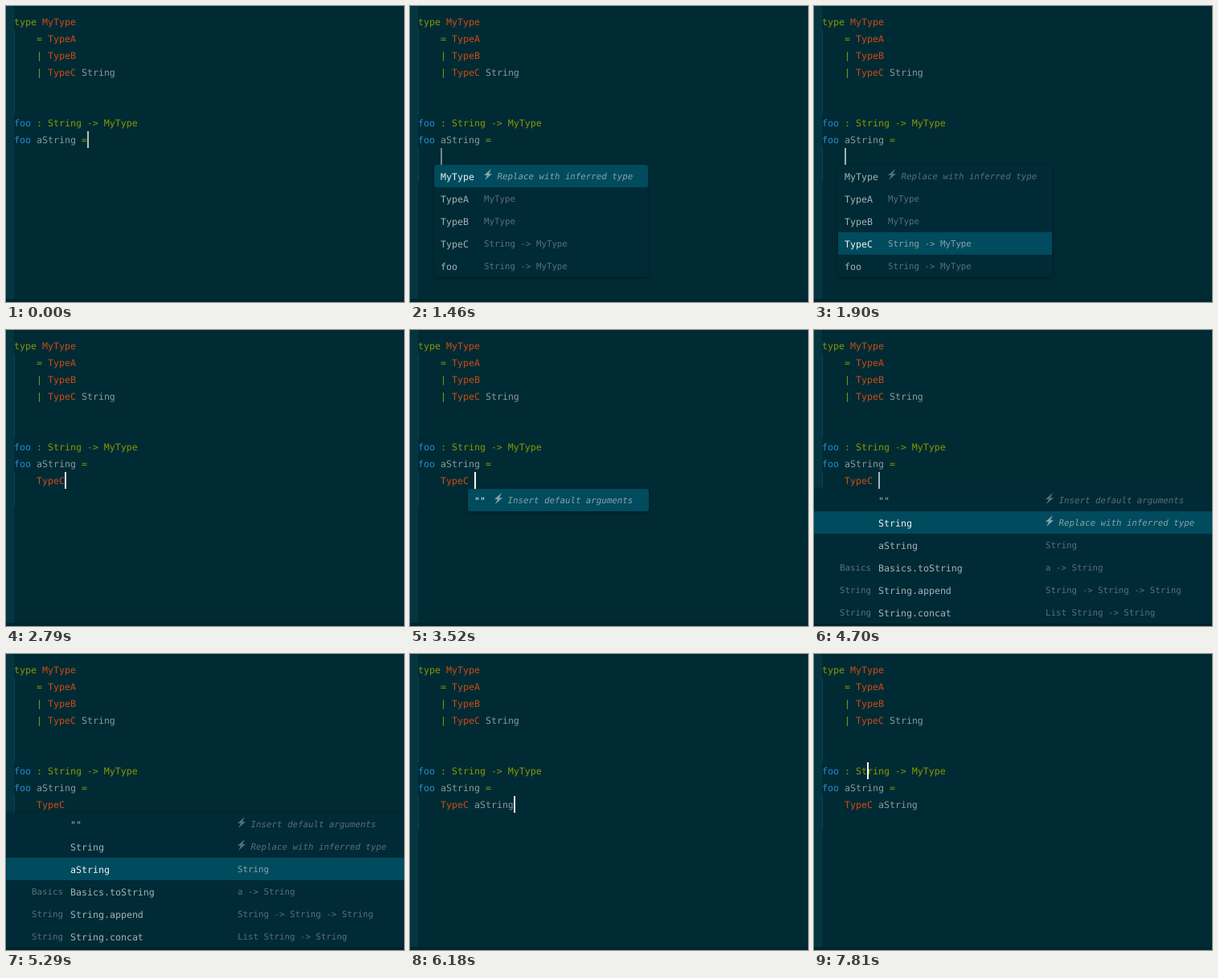
Write an HTML page that moves like this. It is 495 px wide and 369 px high and loops after 8000 ms.

```html
<!DOCTYPE html>
<html lang="en">
<head>
<meta charset="utf-8">
<title>Type-aware completion</title>
<style>
  html, body { margin: 0; width: 100%; height: 100%; overflow: hidden; background: #002b34; }
  svg { display: block; width: 495px; height: 369px; }
  text {
    font: 11.627px "DejaVu Sans Mono", monospace;
    font-variant-ligatures: none;
    text-rendering: geometricPrecision;
    white-space: pre;
  }
  .key { fill: #859900; }
  .type { fill: #cb4b16; }
  .fn { fill: #268bd2; }
  .var { fill: #8a9a9b; }
  .guide { fill: #0b4452; }
  .box { fill: #002a36; filter: drop-shadow(0 1px 2px #001a22); }
  .bar { fill: #004b5d; }
  .word { fill: #a3b3b5; }
  .note { fill: #587077; font-size: 10.797px; }
  .hint { font-style: italic; }
  .bolt { fill: #587077; }
  .on .word { fill: #eef3f3; }
  .on .note, .on .bolt { fill: #86a4ab; }
</style>
</head>
<body>
<svg id="stage" viewBox="0 0 495 369"></svg>
<script>
const LOOP = 8000, LEFT = 10, TOP = 9, CELL = 7, LINE = 21, ROW = 28, MENU_TOP = 198;
const stage = document.getElementById('stage');

function add(parent, tag, attrs, text) {
  const el = document.createElementNS('http://www.w3.org/2000/svg', tag);
  for (const name in attrs) el.setAttribute(name, attrs[name]);
  if (text) el.textContent = text;
  parent.appendChild(el);
  return el;
}

const rect = (parent, x, y, width, height, more) =>
  add(parent, 'rect', { x, y, width, height, ...more });

const show = (el, on) => el.setAttribute('visibility', on ? 'inherit' : 'hidden');

// One code line; parts are [class, text] pairs
function code(row, col, ...parts) {
  const line = add(stage, 'text', { x: LEFT + col * CELL, y: TOP + 15 + row * LINE });
  return parts.map(([cls, text]) => add(line, 'tspan', { class: cls }, text));
}

rect(stage, 0, 0, 495, 369, { fill: '#002b34' });
rect(stage, 0, 0, 10, 369, { fill: '#053541' });
rect(stage, 0, 365, 495, 4, { fill: '#00262f' });
rect(stage, 10, 30, 1, 105, { class: 'guide' });
const bodyGuide = rect(stage, 10, 177, 1, 42, { class: 'guide' });

code(0, 0, ['key', 'type '], ['type', 'MyType']);
code(1, 4, ['key', '= '], ['type', 'TypeA']);
code(2, 4, ['key', '| '], ['type', 'TypeB']);
code(3, 4, ['key', '| '], ['type', 'TypeC '], ['var', 'String']);
code(6, 0, ['fn', 'foo '], ['key', ': String -> MyType']);
code(7, 0, ['fn', 'foo '], ['var', 'aString '], ['key', '=']);
const [ctor, arg] = code(8, 4, ['type', 'TypeC '], ['var', 'aString']);

// Items are [word, note, module]; a note starting with "!" is an italic hint
function menu(x, width, radius, wordX, noteX, items) {
  const group = add(stage, 'g', {});
  const height = items.length * ROW;
  rect(group, x, MENU_TOP, width, height, { class: 'box', rx: radius });
  const bar = rect(group, x, MENU_TOP, width, ROW, { class: 'bar' });
  const rows = items.map(([word, note, module], i) => {
    const y = MENU_TOP + i * ROW, row = add(group, 'g', {});
    add(row, 'text', { class: 'word', x: wordX, y: y + 18.5 }, word);
    if (module) add(row, 'text', { class: 'note', x: wordX - 9, y: y + 18, 'text-anchor': 'end' }, module);
    if (note[0] === '!') {
      add(row, 'path', { class: 'bolt', d: 'M10 7H6l3-7-9 9h4l-3 7z', transform: `translate(${noteX} ${y + 5}) scale(1 .88)` });
      add(row, 'text', { class: 'note hint', x: noteX + 16.5, y: y + 18 }, note.slice(1));
    } else {
      add(row, 'text', { class: 'note', x: noteX, y: y + 18 }, note);
    }
    return row;
  });
  return pick => {
    show(group, pick >= 0);
    if (pick < 0) return;
    bar.setAttribute('y', MENU_TOP + pick * ROW);
    bar.setAttribute('rx', pick ? 0 : radius);
    rows.forEach((row, i) => row.setAttribute('class', i === pick ? 'on' : ''));
  };
}

const menus = [
  menu(30, 266, 3, 38, 92, [
    ['MyType', '!Replace with inferred type'],
    ['TypeA', 'MyType'],
    ['TypeB', 'MyType'],
    ['TypeC', 'String -> MyType'],
    ['foo', 'String -> MyType']
  ]),
  menu(72, 225, 3, 80, 105, [['""', '!Insert default arguments']]),
  menu(0, 495, 0, 80, 288, [
    ['""', '!Insert default arguments'],
    ['String', '!Replace with inferred type'],
    ['aString', 'String'],
    ['Basics.toString', 'a -> String', 'Basics'],
    ['String.append', 'String -> String -> String', 'String'],
    ['String.concat', 'List String -> String', 'String']
  ])
];
const caret = rect(stage, 0, 0, 2, LINE, { fill: '#f6f5ee' });

// [time, open menu, picked row]
const menuSteps = [
  [0, -1, 0], [1020, 0, 0], [1600, 0, 1], [1750, 0, 2], [1890, 0, 3], [2780, -1, 0],
  [3510, 1, 0], [3950, 2, 0], [4550, 2, 1], [4995, 2, 2], [5725, -1, 0]
];
// [time, column, line, blink start]
const caretSteps = [
  [0, 13, 7, -160], [880, 4, 8, 1243], [2780, 9, 8, 3190], [3365, 10, 8, 4040],
  [5725, 17, 8, 6130], [6915, 13, 7, LOOP], [7060, 17, 6, LOOP],
  [7360, 16, 6, LOOP], [7660, 13, 6, LOOP], [7800, 8, 6, LOOP]
];
const at = (steps, t) => steps.filter(step => step[0] <= t).pop();

// The caret fades in coarse ticks
function glow(t, start) {
  const tick = Math.floor((t + 30) / 147.7) * 147.7 - 20;
  return tick < start ? 1 : 0.5 + 0.5 * Math.cos((tick - start) / 820 * 2 * Math.PI);
}

function draw() {
  const t = performance.now() % LOOP;
  const [, open, pick] = at(menuSteps, t);
  menus.forEach((set, i) => set(i === open ? pick : -1));

  const [, col, line, start] = at(caretSteps, t);
  caret.setAttribute('x', LEFT + col * CELL);
  caret.setAttribute('y', TOP + line * LINE);
  caret.setAttribute('opacity', glow(t, start));

  show(bodyGuide, t >= 880);
  show(ctor, t >= 2780);
  show(arg, t >= 5725);
  requestAnimationFrame(draw);
}
draw();
</script>
</body>
</html>
```
